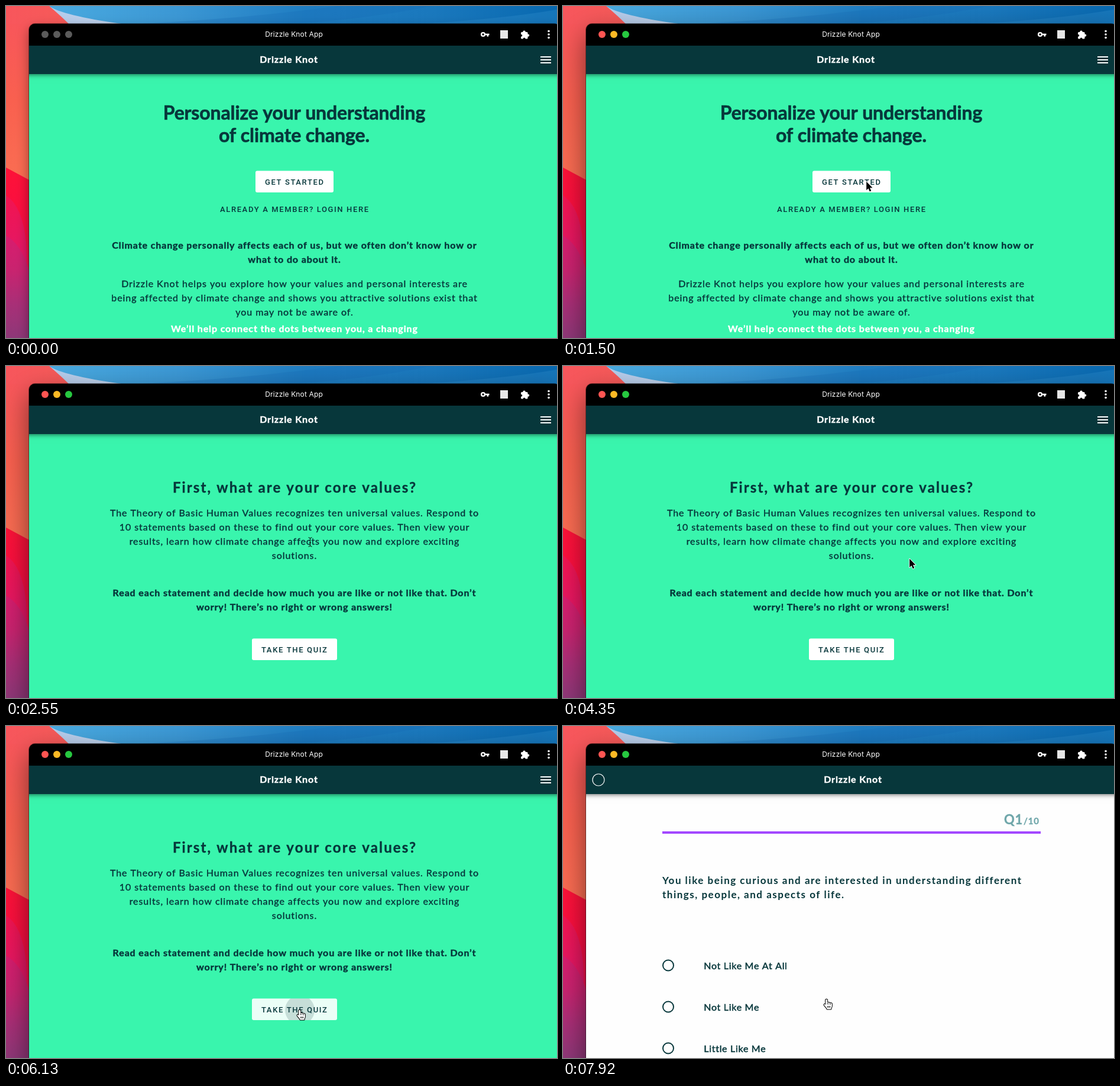
An HTML page with a canvas that plays this animation: 932 px wide and 561 px high, repeating every 8000 ms.

```html
<!DOCTYPE html>
<html lang="en">
<head>
<meta charset="utf-8">
<title>Drizzle Knot App</title>
<style>
  html, body { margin: 0; width: 100%; height: 100%; overflow: hidden; }
  canvas { display: block; }
</style>
</head>
<body>
<canvas id="stage" width="932" height="561"></canvas>
<script>
const ctx = document.getElementById('stage').getContext('2d');
const LOOP = 8000;
const GREEN = '#39f5ad', TEAL = '#07373b', NAME = 'Drizzle Knot';
const WIN = { x: 39, y: 30, w: 898, h: 600 };
const MID = 487.5;

// Text styles: stroke thickens a cut slightly
const STYLES = {
  title:   { font: '400 12px Inter, sans-serif', gap: 0.15 },
  bold:    { font: '700 16px Lato, sans-serif', gap: 0.87, stroke: 0.45 },
  body:    { font: '400 16px Lato, sans-serif', gap: 0.94, stroke: 0.4 },
  hero:    { font: '700 32px Lato, sans-serif', gap: -0.13, stroke: 0.6 },
  heading: { font: '700 24px Lato, sans-serif', gap: 2.12, stroke: 0.4 },
  button:  { font: '500 13px Roboto, sans-serif', gap: 1.63 },
  ask:     { font: '700 17px Lato, sans-serif', gap: 1.51 },
  option:  { font: '400 16px Lato, sans-serif', gap: 0.7, stroke: 0.5 },
  count:   { font: '700 22px Lato, sans-serif', gap: 0.6, stroke: 0.4 },
  total:   { font: '700 15px Lato, sans-serif', gap: 0.8, stroke: 0.3 }
};

// When each cursor pose begins: time, kind, left, top
const CURSOR = [
  [450, 'arrow', 610, 510], [600, 'arrow', 553, 389], [750, 'arrow', 516, 328],
  [900, 'arrow', 512, 314], [1050, 'arrow', 512, 296], [2250, 'hand', 509, 297],
  [2550, 'beam', 510, 289], [4350, 'arrow', 585, 325], [4500, 'arrow', 604, 363],
  [4650, 'beam', 576, 409], [4800, 'arrow', 529, 451], [4950, 'arrow', 507, 466],
  [5090, 'arrow', 494, 478], [5240, 'hand', 491, 479], [6580, 'hand', 491, 478],
  [7630, 'hand', 481, 470], [7780, 'hand', 461, 461], [7920, 'hand', 440, 461]
];

const ARROW = new Path2D('M1.2 .8V15.2L4.5 12.2L6.8 17.4L9.3 16.3L7 11.3H11.5Z');
const HAND = new Path2D('M4.2 10V2.3a1.5 1.5 0 0 1 3 0V7a1.4 1.4 0 0 1 2.7 .2' +
  'a1.4 1.4 0 0 1 2.6 .6a1.3 1.3 0 0 1 2.4 .8V12c0 2-1.5 3-1.5 5.4H6.6' +
  'C6 15 2.6 12.6 1.6 10.6c-.8-1.6 1-2.2 1.8-1.2z');
const HAND_LINES = new Path2D('M7.6 12V15M9.6 12V15M11.6 12V15M7.2 7V9.5M9.9 7.5V9.5M12.5 8V9.8');
const BEAM = new Path2D('M1.5 .8Q4.5 .8 4.5 3V14Q4.5 16.2 1.5 16.2' +
  'M7.5 .8Q4.5 .8 4.5 3M4.5 14Q4.5 16.2 7.5 16.2M3 9.5H6');

function text(str, x, y, style, color = TEAL, align = 'center') {
  const s = STYLES[style];
  ctx.font = s.font;
  ctx.letterSpacing = s.gap + 'px';
  ctx.textAlign = align;
  ctx.fillStyle = color;
  if (align === 'center') x += s.gap / 2;
  ctx.fillText(str, x, y);
  if (s.stroke) {
    ctx.strokeStyle = color;
    ctx.lineWidth = s.stroke;
    ctx.strokeText(str, x, y);
  }
}

function lines(list, x, y, step, style, color, align) {
  list.forEach((str, i) => text(str, x, y + i * step, style, color, align));
}

function rect(x, y, w, h, color) {
  ctx.fillStyle = color;
  ctx.fillRect(x, y, w, h);
}

function roundRect(x, y, w, h, r, color) {
  ctx.beginPath();
  ctx.roundRect(x, y, w, h, r);
  ctx.fillStyle = color;
  ctx.fill();
}

function disc(x, y, r, color) {
  ctx.beginPath();
  ctx.arc(x, y, r, 0, Math.PI * 2);
  ctx.fillStyle = color;
  ctx.fill();
}

function ring(x, y, r, width, color) {
  ctx.beginPath();
  ctx.arc(x, y, r, 0, Math.PI * 2);
  ctx.lineWidth = width;
  ctx.strokeStyle = color;
  ctx.stroke();
}

function shadow(alpha, blur, drop) {
  ctx.shadowColor = `rgba(0,0,0,${alpha})`;
  ctx.shadowBlur = blur;
  ctx.shadowOffsetY = drop;
}

function blend(x0, y0, x1, y1, ...colors) {
  const g = ctx.createLinearGradient(x0, y0, x1, y1);
  colors.forEach((c, i) => g.addColorStop(i / (colors.length - 1), c));
  return g;
}

function shape(path, color) {
  ctx.fillStyle = color;
  ctx.fill(new Path2D(path));
}

function wallpaper() {
  rect(0, 0, 932, 60, blend(80, 0, 932, 0, '#49a9df', '#3b97d4', '#1f7dc2', '#1a78bd', '#0869b0'));
  shape('M230 30Q420 20 560 0H720Q600 24 480 30Z', 'rgba(20,105,180,.25)');
  shape('M700 30Q840 22 932 6V30Z', 'rgba(60,150,210,.25)');
  shape('M73 0Q95 16 195 30V40H100Z', blend(75, 0, 195, 0, '#b3caea', '#c3d4ec'));
  shape('M0 0H73Q92 16 107 31V60H0Z', blend(0, 0, 107, 0, '#f8565c', '#f65a58'));
  rect(0, 30, 60, 270, blend(0, 30, 0, 290, '#f8565a', '#f9604f', '#fa6d52'));
  shape('M0 273L60 305V561H0Z', blend(0, 275, 0, 561, '#fd1238', '#fa0d42', '#ea1254', '#cc1b66'));
  shape('M0 320Q28 338 34 400Q38 450 28 561H0Z', blend(0, 320, 0, 561, '#f21450', '#e0186a', '#c02472'));
  shape('M0 388Q26 402 40 450V561H0Z', blend(0, 388, 0, 561, '#d81c6e', '#c9236f', '#a92f77', '#8e3878'));
}

function windowFrame(active) {
  ctx.save();
  if (active) shadow(0.5, 46, 18);
  else shadow(0.4, 20, 8);
  roundRect(WIN.x, WIN.y, WIN.w, WIN.h, 10, '#000');
  ctx.restore();
  ctx.beginPath();
  ctx.roundRect(WIN.x - 0.5, WIN.y - 0.5, WIN.w + 1, WIN.h + 1, 10.5);
  ctx.lineWidth = 1;
  ctx.strokeStyle = 'rgba(0,0,0,.4)';
  ctx.stroke();
}

function puzzle(x, y) {
  roundRect(x, y + 3, 11.5, 11.5, 1.5, '#fff');
  disc(x + 5.5, y + 2.6, 2.2, '#fff');
  disc(x + 12, y + 8.6, 2.2, '#fff');
  disc(x + 0.4, y + 8.8, 1.9, '#000');
  disc(x + 5.6, y + 14.3, 1.9, '#000');
}

function titleBar(active) {
  rect(39, 30, 900, 37, '#000');
  const lights = active ? ['#ff5552', '#fdb925', '#27c840'] : ['#5b5b5b', '#5b5b5b', '#5b5b5b'];
  lights.forEach((c, i) => disc(66 + i * 20, 48, 6, c));
  text(NAME + ' App', 487, 52, 'title', '#fff');
  ring(807, 48, 2.9, 2.4, '#fff');
  rect(810, 46.7, 7.5, 2.6, '#fff');
  rect(813.5, 48, 2.6, 3.6, '#fff');
  rect(836, 41, 13, 14, '#e6e6e6');
  puzzle(871, 41);
  [42.5, 48, 53.5].forEach(y => disc(918, y, 1.8, '#fff'));
}

function appBar(quiz) {
  ctx.save();
  for (const layer of [[0.2, 4, 2], [0.14, 5, 4], [0.12, 10, 1]]) {
    shadow(...layer);
    rect(30, 67, 920, 48, TEAL);
  }
  ctx.restore();
  text(NAME, quiz ? 490 : 478, 96, 'bold', '#fff');
  if (quiz) ring(60, 91, 10, 1.2, '#fff');
  else [85, 90, 95].forEach(y => rect(904, y, 18, 2, '#fff'));
}

function button(label, x, y, w, baseline, fill, ripple) {
  ctx.save();
  roundRect(x, y, w, 36.5, 3, fill);
  ctx.clip();
  if (ripple) disc(...ripple, 'rgba(7,55,59,.16)');
  ctx.restore();
  text(label, MID, baseline, 'button');
}

function welcome(t) {
  rect(39, 115, 900, 446, GREEN);
  lines(['Personalize your understanding', 'of climate change.'], MID, 192, 38, 'hero');
  button('GET STARTED', 422, 278.5, 132, 302, '#fff', t >= 2400 && [515, 297, 10]);
  text('ALREADY A MEMBER? LOGIN HERE', MID, 347.5, 'button');
  lines(['Climate change personally affects each of us, but we often don’t know how or',
    'what to do about it.'], MID, 410, 24, 'bold');
  lines([NAME + ' helps you explore how your values and personal interests are',
    'being affected by climate change and shows you attractive solutions exist that',
    'you may not be aware of.'], MID, 475, 24, 'body');
  text('We’ll help connect the dots between you, a changing', MID, 551, 'bold', '#fff');
}

function intro(t) {
  rect(39, 115, 900, 446, GREEN);
  text('First, what are your core values?', MID, 214, 'heading');
  lines(['The Theory of Basic Human Values recognizes ten universal values. Respond to',
    '10 statements based on these to find out your core values. Then view your',
    'results, learn how climate change affects you now and explore exciting',
    'solutions.'], MID, 254, 24, 'body');
  lines(['Read each statement and decide how much you are like or not like that. Don’t',
    'worry! There’s no right or wrong answers!'], MID, 389, 24, 'bold');
  button('TAKE THE QUIZ', 416, 460.5, 144, 484, t >= 5090 ? '#ebfef7' : '#fff',
    t >= 6130 && [497, 480, 25]);
}

function quiz() {
  rect(39, 115, 900, 446, '#fefefe');
  text('Q1', 746, 166, 'count', '#6fa6aa', 'left');
  text('/10', 779, 166, 'total', '#6fa6aa', 'left');
  rect(168, 178, 640, 4, '#a347ff');
  lines(['You like being curious and are interested in understanding different',
    'things, people, and aspects of life.'], 168, 267, 24, 'ask', TEAL, 'left');
  ['Not Like Me At All', 'Not Like Me', 'Little Like Me'].forEach((label, i) => {
    ring(178, 404.5 + i * 70, 9, 2, TEAL);
    text(label, 238.3, 411 + i * 70, 'option', TEAL, 'left');
  });
}

function outline(path, fill, edge, width) {
  ctx.lineWidth = width;
  ctx.strokeStyle = edge;
  ctx.fillStyle = fill;
  ctx.stroke(path);
  ctx.fill(path);
}

function cursor(t) {
  const pose = CURSOR.filter(p => p[0] <= t).pop();
  if (!pose) return;
  const [, kind, x, y] = pose;
  ctx.save();
  ctx.translate(x, y);
  ctx.lineJoin = 'round';
  if (kind === 'arrow') {
    outline(ARROW, '#000', '#fff', 1.8);
  } else if (kind === 'hand') {
    outline(HAND, '#fff', '#000', 2);
    ctx.lineWidth = 0.9;
    ctx.stroke(HAND_LINES);
  } else {
    ctx.lineWidth = 1;
    ctx.strokeStyle = '#000';
    ctx.stroke(BEAM);
  }
  ctx.restore();
}

function draw(t) {
  const active = t >= 1500, onQuiz = t >= 6280;
  wallpaper();
  windowFrame(active);
  ctx.save();
  ctx.beginPath();
  ctx.roundRect(WIN.x, WIN.y, WIN.w, WIN.h, 10);
  ctx.clip();
  if (onQuiz) quiz();
  else if (t >= 2550) intro(t);
  else welcome(t);
  appBar(onQuiz);
  titleBar(active);
  ctx.restore();
  cursor(t);
}

const start = performance.now();
function tick() {
  draw((performance.now() - start) % LOOP);
  requestAnimationFrame(tick);
}
tick();
</script>
</body>
</html>
```
